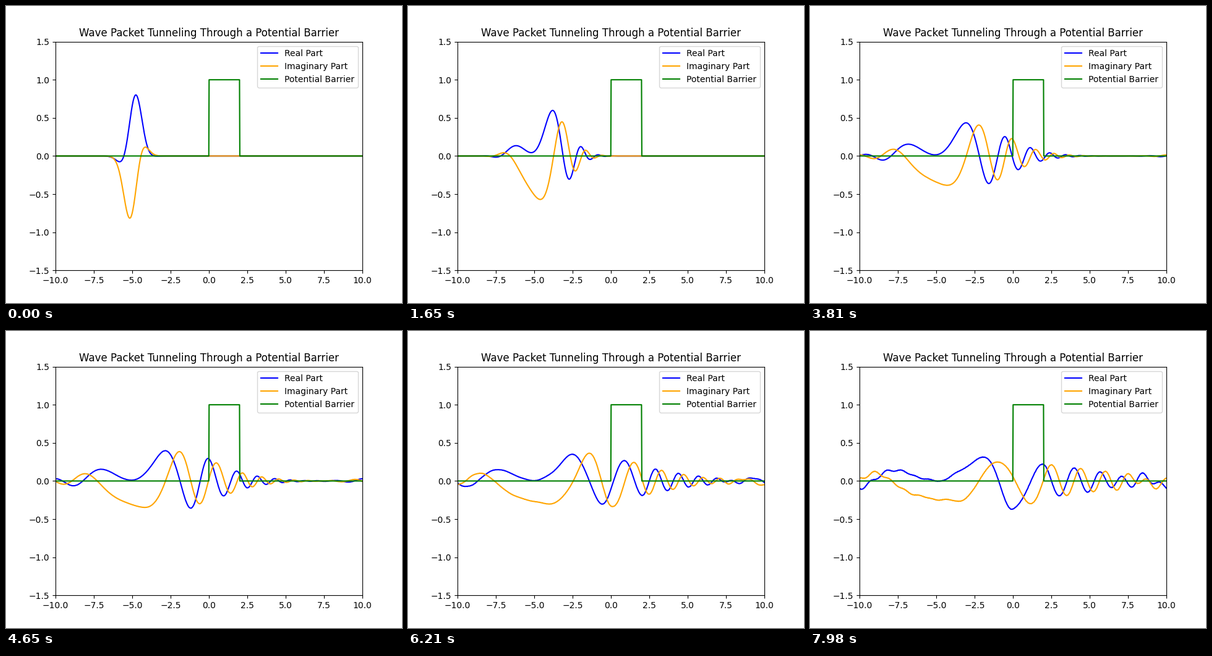
Write a matplotlib script that moves like this. It is 640 px wide and 480 px high and loops after 8000 ms.

```python
import numpy as np
import matplotlib.pyplot as plt
from matplotlib.animation import FuncAnimation

LOOP_MS = 8000
FRAMES = 267

# Space and time grid (hbar = m = 1)
N = 1000
DT = 0.01
x = np.linspace(-10, 10, N)
k = 2 * np.pi * np.fft.fftfreq(N, d=x[1] - x[0])

# Gaussian packet and square barrier
X0, SIGMA, ENERGY = -5.0, 0.5, 1.0
V0, WIDTH = 1.5, 2.0
k0 = np.sqrt(2 * ENERGY)
barrier = np.where((x >= 0) & (x <= WIDTH), V0, 0.0)

half_potential = np.exp(-0.5j * barrier * DT)
kinetic = np.exp(-0.5j * k**2 * DT)


def step(psi):
    """Advance the wave by one split-operator step."""
    psi = np.fft.ifft(kinetic * np.fft.fft(half_potential * psi))
    return half_potential * psi


def evolve(count):
    """Return the wave at each shown time, starting two steps in."""
    psi = np.exp(-(x - X0)**2 / (2 * SIGMA**2) + 1j * k0 * x)
    psi = step(psi)
    states = []
    for _ in range(count):
        psi = step(psi)
        states.append(psi)
    return states


waves = evolve(FRAMES)

fig, ax = plt.subplots(figsize=(6.4, 4.8), dpi=100)
real_line, = ax.plot(x, waves[0].real, color="blue", label="Real Part")
imag_line, = ax.plot(x, waves[0].imag, color="orange", label="Imaginary Part")
ax.plot(x, barrier / V0, color="green", label="Potential Barrier")
ax.set_xlim(-10, 10)
ax.set_ylim(-1.5, 1.5)
ax.set_title("Wave Packet Tunneling Through a Potential Barrier")
ax.legend(loc="upper right")


def update(i):
    real_line.set_ydata(waves[i].real)
    imag_line.set_ydata(waves[i].imag)
    return real_line, imag_line


anim = FuncAnimation(fig, update, frames=FRAMES, interval=LOOP_MS / FRAMES,
                     repeat=True, repeat_delay=0)
plt.show()
```
